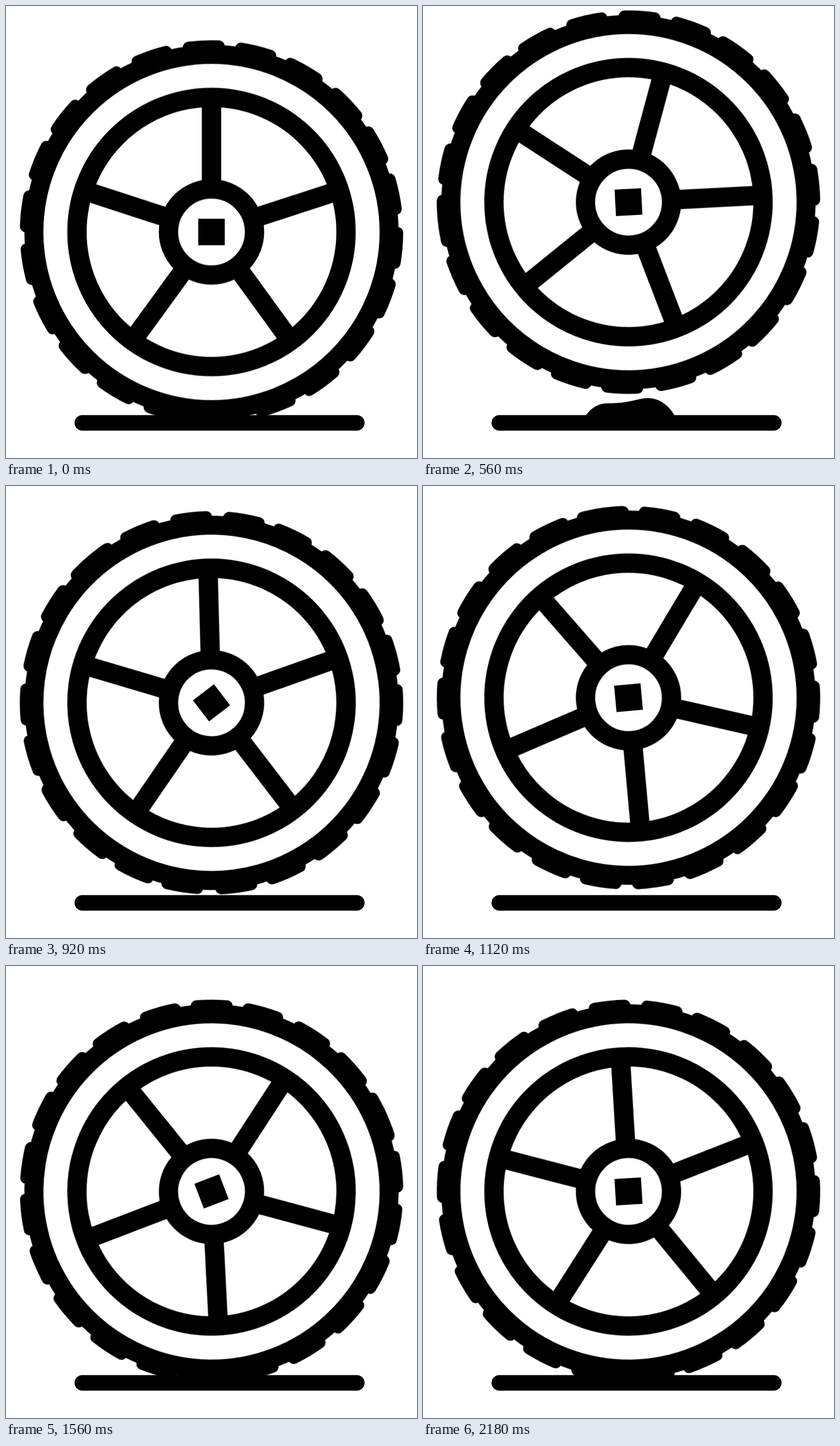
Recreate the animation shown at these times as an HTML page. Size 714 by 785 pixels, loop 2.2 s.

```html
<!DOCTYPE html>
<html lang="en">
<head>
<meta charset="utf-8">
<title>Rolling wheel</title>
<style>
  html, body { margin: 0; width: 100%; height: 100%; overflow: hidden; background: #fff; }
  svg { display: block; width: 714px; height: 785px; }
  .line { fill: none; stroke: #000; }
  .hop, .spin, .bump { animation: 2200ms linear -2ms infinite; }
  .hop { animation-name: hop; }
  .spin { animation-name: spin; }
  .bump { animation-name: bump; }

  /* kicked up by the bump, then falling and bouncing */
  @keyframes hop {
    0% { transform: translateY(0); }
    16.8% { transform: translateY(0); animation-timing-function: cubic-bezier(.333, .8, .667, 1); }
    30.9% { transform: translateY(-58.4px); animation-timing-function: cubic-bezier(.333, 0, .667, .333); }
    43.7% { transform: translateY(0); animation-timing-function: cubic-bezier(.333, .667, .667, 1); }
    51.6% { transform: translateY(-25px); animation-timing-function: cubic-bezier(.333, 0, .667, .333); }
    59.4% { transform: translateY(-1px); animation-timing-function: cubic-bezier(.333, .667, .667, 1); }
    63.6% { transform: translateY(-5px); animation-timing-function: cubic-bezier(.333, 0, .667, .333); }
    68.2%, 99.1% { transform: translateY(-1px); }
    100% { transform: translateY(0); }
  }

  /* slows a little on impact, then catches up */
  @keyframes spin {
    0% { transform: rotate(0deg); }
    14.55% { transform: rotate(52.4deg); }
    25.45% { transform: rotate(87deg); }
    41.82% { transform: rotate(142.5deg); }
    59.09% { transform: rotate(203.9deg); }
    83.64% { transform: rotate(297.7deg); }
    100% { transform: rotate(360deg); }
  }

  /* rises out of the ground, slides left, sinks again */
  @keyframes bump {
    0%, 11.36% { transform: translate(214px, 16px) scaleY(.5); }
    14.55% { transform: translate(166px, 8.5px) scaleY(.6); }
    20% { transform: translate(83px, 0) scaleY(1); }
    25.45% { transform: translate(0, 0) scaleY(1); }
    30.9% { transform: translate(-83px, 0) scaleY(1); }
    35.9% { transform: translate(-159px, 8.5px) scaleY(.6); }
    39.5%, 100% { transform: translate(-214px, 16px) scaleY(.5); }
  }
</style>
</head>
<body>
<svg viewBox="0 0 714 785">
  <clipPath id="above"><rect x="120" y="-60" width="502" height="61"/></clipPath>
  <g transform="translate(0 711)" clip-path="url(#above)">
    <path class="bump" d="M283 0C293-14 305-21 322-21C350-21 360-25 380-29C405-34 425-21 437 0Z"/>
  </g>
  <path class="line" d="M132.5 724H609.5" stroke-width="26.8" stroke-linecap="round"/>
  <g transform="translate(357 392.5)">
    <g class="hop">
      <g class="spin">
        <circle class="line" r="308.5" stroke-width="33"/>
        <g id="tread" class="line" stroke-width="20" stroke-linecap="round"></g>
        <circle class="line" r="233.7" stroke-width="33.6"/>
        <g id="spokes" class="line" stroke-width="33.6"></g>
        <circle class="line" r="74.7" stroke-width="33.6"/>
        <rect x="-23" y="-23" width="46" height="46"/>
      </g>
    </g>
  </g>
</svg>
<script>
  const R = 323;
  // centre angles of the tread blocks, clockwise from the top
  const blocks = [-2.4, 13.8, 29.8, 46.6, 62.2, 78.2, 94.9, 111, 127, 143.6, 159.8,
    177.2, 194.8, 211.2, 227.6, 243.4, 260, 276.4, 292.6, 308.2, 324.6, 341.2];

  const addPath = (id, d) => {
    const path = document.createElementNS('http://www.w3.org/2000/svg', 'path');
    path.setAttribute('d', d);
    document.getElementById(id).append(path);
  };

  const polar = (r, deg) => {
    const a = deg * Math.PI / 180;
    return `${(r * Math.sin(a)).toFixed(2)} ${(-r * Math.cos(a)).toFixed(2)}`;
  };

  blocks.forEach((mid, i) => {
    const half = i === 11 ? 6.3 : 4.7;
    addPath('tread', `M${polar(R, mid - half)}A${R} ${R} 0 0 1 ${polar(R, mid + half)}`);
  });

  for (let i = 0; i < 5; i++) addPath('spokes', `M${polar(75, i * 72)}L${polar(232, i * 72)}`);

  // hold each pose for 20 ms
  document.getAnimations().forEach(a => a.effect.updateTiming({ easing: 'steps(110)' }));
</script>
</body>
</html>
```
